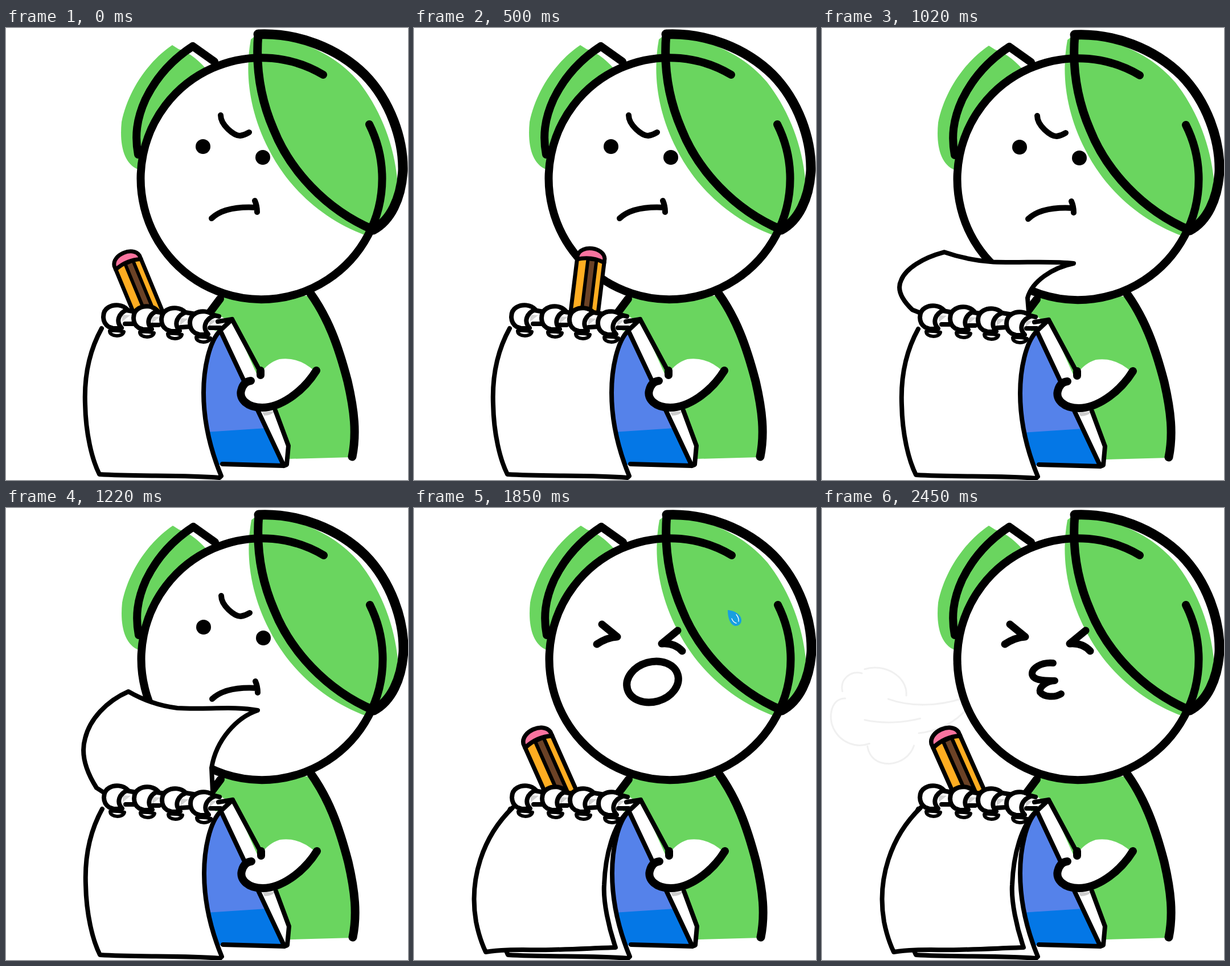
Animation, 706 px wide and 793 px high, one loop 2510 ms. Source, as an HTML page:

```html
<!DOCTYPE html>
<html lang="en">
<head>
<meta charset="utf-8">
<title>Sketching and sighing</title>
<style>
  html, body { margin: 0; width: 100%; height: 100%; overflow: hidden; background: #fff; }
  svg { display: block; width: 706px; height: 793px; }
  path, circle, ellipse { fill: none; stroke-linecap: round; stroke-linejoin: round; }
  .ink { stroke: #000; stroke-width: 14; }
  .thin { stroke: #000; stroke-width: 8; }
  .white { fill: #fff; }
  .green { fill: #6ad55f; }
  .dot { fill: #000; }
</style>
</head>
<body>
<svg viewBox="0 0 706 793">
  <defs>
    <g id="ring">
      <path class="thin white" style="stroke-width:6" d="M182 531C181 542 205 543 207 533Q196 530 182 531Z"/>
      <path class="thin white" d="M213 494C205 485 190 484 180 490C168 497 168 516 180 524Q190 529 203 526C192 515 198 500 213 494"/>
    </g>
  </defs>

  <g id="scene">
    <!-- body -->
    <path class="green" d="M376 470H535C565 508 583 555 600 620C612 672 616 712 608 753L495 756L400 620L355 502Z"/>
    <path class="ink" d="M376 475L358 499"/>
    <path class="ink" style="stroke-width:15" d="M535 466C565 508 583 555 600 620C612 672 616 712 608 752"/>

    <!-- head and hair -->
    <path class="green" d="M292 30C250 58 214 110 203 165C199 205 207 238 232 248L262 170L350 70Q325 43 303 37Z"/>
    <circle class="white" cx="450" cy="265" r="212"/>
    <path class="green" d="M430 20C419 80 427 145 461 212C494 278 553 335 632 364C664 345 685 300 687 265C681 200 655 140 620 95C580 48 520 18 440 12Z"/>
    <path class="ink" d="M557 82A212 212 0 1 0 638 169"/>
    <path class="ink" d="M232 222C226 190 229 160 245 125C264 86 294 54 328 32L366 59"/>
    <path class="ink" style="stroke-width:15" d="M443 11C438 70 447 125 470 178C498 248 560 318 645 354"/>
    <path class="ink" style="stroke-width:17" d="M443 11C512 8 582 35 630 82C675 128 698 195 697 250C694 300 675 338 645 354"/>

    <!-- faces -->
    <g id="frown" class="ink" style="stroke-width:10">
      <circle class="dot" cx="346" cy="208" r="13" stroke="none"/>
      <circle class="dot" cx="451" cy="227" r="13" stroke="none"/>
      <path d="M377 153C377 170 400 189 411 189Q419 188 427 183M361 334C378 318 405 313 440 315M437 303Q441 312 441 323"/>
    </g>
    <g id="squint" class="ink" style="stroke-width:13">
      <path d="M329 203L356 225Q338 226 320 238M462 214L434 237Q456 235 470 250"/>
      <ellipse id="gasp" cx="418" cy="304" rx="46" ry="35" transform="rotate(-16 418 304)"/>
      <path id="pucker" style="stroke-width:12" d="M405 271C384 269 367 280 368 291C371 303 394 302 408 302C390 303 380 315 382 322C389 331 408 332 419 325"/>
    </g>

    <!-- pencil, standing on its base at the local zero point -->
    <g id="pencil" class="thin" style="stroke-width:7">
      <path style="fill:#ffad21" d="M-24 12V-90Q0 -98 24 -90V12Z"/>
      <path style="fill:#6b4226;stroke-width:6" d="M-5 12V-92H10V12Z"/>
      <path style="fill:#f9739f" d="M-24 -89Q0 -98 24 -89V-96C20 -116 -20 -116 -24 -96Z"/>
    </g>

    <!-- notebook -->
    <path class="white" d="M376 530L397 511L497 733L490 768Z"/>
    <path style="fill:#5582ea" d="M376 530L458 704L340 712Q330 590 376 530Z"/>
    <path style="fill:#0477e6" d="M350 709L457 702L488 768L365 766Z"/>
    <path style="fill:#ccc" d="M450 674L472 672Q466 680 453 680Z"/>
    <path class="thin" d="M376 530L488 768L380 765M397 511L446 602M473 671L496 733L493 766L488 768"/>
    <path class="thin white" d="M168 527C147 565 137 610 139 660C140 712 151 757 164 783C230 787 310 784 375 789L378 786C359 740 347 690 347 640C347 597 357 550 376 531"/>
    <path id="sheet" class="thin white" vector-effect="non-scaling-stroke"/>

    <!-- arm -->
    <path class="white" d="M429 620L447 606Q460 587 480 581Q515 576 543 603C520 641 480 667 450 667C424 666 409 651 413 636Z"/>
    <path class="ink" d="M545 601C520 641 480 666 450 666C424 666 409 651 413 636Q417 620 430 619"/>
    <path class="ink" d="M447 601V609"/>

    <!-- binding -->
    <path class="white" d="M186 497L372 503L390 513L374 528L180 526Z"/>
    <path style="fill:#d2d2d2" d="M204 503l14 1l-14 11zM256 506l14 1l-14 11zM306 509l14 1l-14 11zM357 512l12 1l-12 10z"/>
    <path class="thin" d="M211 495L228 498M258 497L278 500M309 498L328 501M358 502L374 506M209 519H225M257 521H268M307 525L323 524M358 526H376M372 515L397 511L379 528"/>
    <use href="#ring"/>
    <use href="#ring" x="53" y="2"/>
    <use href="#ring" x="102" y="5"/>
    <use href="#ring" x="152" y="11"/>
  </g>

  <g id="puff" stroke="#000" stroke-width="2.5">
    <path d="M121 309C117 291 134 278 149 283M153 277C181 268 215 287 213 315M125 319C105 319 100 345 108 362C118 383 141 391 160 384M157 388C160 405 172 413 188 413C205 412 219 402 224 387M187 320C220 332 260 330 294 319M153 350C180 356 210 354 233 348M231 369C260 366 285 352 299 335"/>
  </g>
  <g id="drop">
    <path style="fill:#189fe0" d="M-12 -14C0 -13 12 -6 12 4C12 11 6 14 1 14C-8 12 -12 0 -12 -14Z"/>
    <path stroke="#fff" stroke-width="1.3" d="M3 -6Q8 0 7 6M-5 1Q-2 8 3 9"/>
  </g>
</svg>

<script>
const LOOP = 2510, STEP = 30;
const el = id => document.getElementById(id);
const show = (id, on) => el(id).style.display = on ? "" : "none";
const place = (id, x, y, turn, scale) =>
  el(id).setAttribute("transform", `translate(${x} ${y}) rotate(${turn}) scale(${scale})`);

const RAISED = "M172 499L158 490C139 460 130 430 138 403C146 370 175 338 214 321C245 339 275 347 300 350C350 353 400 346 441 354C405 366 368 405 360 455L362 497";
// start time, outline, height factor
const SHEETS = [
  [920, RAISED, 0.3],
  [1020, RAISED, 0.6],
  [1120, RAISED, 0.85],
  [1220, RAISED, 1],
  [1320, "M172 499C150 470 110 440 67 440C130 400 220 380 300 385C330 410 352 450 362 497", 1],
  [1420, "M172 517C120 500 50 540 5 610C70 640 150 660 240 665C270 590 320 545 375 530", 1],
  [1520, "M172 525C120 575 95 650 108 725Q114 755 125 778C160 772 200 775 240 774S320 771 353 770C341 735 331 690 333 660C335 605 350 556 374 532", 1]
];

function draw(now) {
  const t = now % LOOP;
  const q = 200 + Math.floor((t - 200) / STEP) * STEP;
  const sighing = t >= 1620, blowing = t >= 1880;

  const nudge = t >= 820 ? 1 : 0;
  place("scene", nudge, nudge, 0, 1);

  show("frown", !sighing);
  show("squint", sighing);
  show("gasp", !blowing);
  show("pucker", blowing);

  show("pencil", t < 820 || sighing);
  if (sighing) {
    place("pencil", 257, 497, -24, 1.08);
  } else {
    const k = Math.min(1, Math.max(0, (q - 170) / 450)) ** 1.57;
    place("pencil", 249 + 82 * k, 497, -22.5 + 48 * k, 1);
  }

  const sheet = SHEETS.findLast(s => t >= s[0]);
  show("sheet", sheet);
  if (sheet) {
    const [, d, height] = sheet;
    el("sheet").setAttribute("d", d);
    el("sheet").setAttribute("transform", `translate(0 ${499 * (1 - height)}) scale(1 ${height})`);
  }

  // the breath spreads out from a point behind the mouth
  const s = 1 + (q - 2180) * 0.000815;
  show("puff", t >= 1970);
  place("puff", 508 * (1 - s), 251 * (1 - s), 0, s);
  el("puff").style.opacity = Math.max(0, 0.5 - (q - 2180) * 0.00163);

  const age = (q - 1850) / 330;
  show("drop", t >= 1820);
  place("drop", 563 + 30 * age, 193 + 39 * age, 0, 1 + 0.5 * age);
  el("drop").style.opacity = Math.min(1, Math.max(0, 1 - 0.6 * age));
}

const start = performance.now();
(function tick() {
  draw(performance.now() - start);
  requestAnimationFrame(tick);
})();
</script>
</body>
</html>
```
